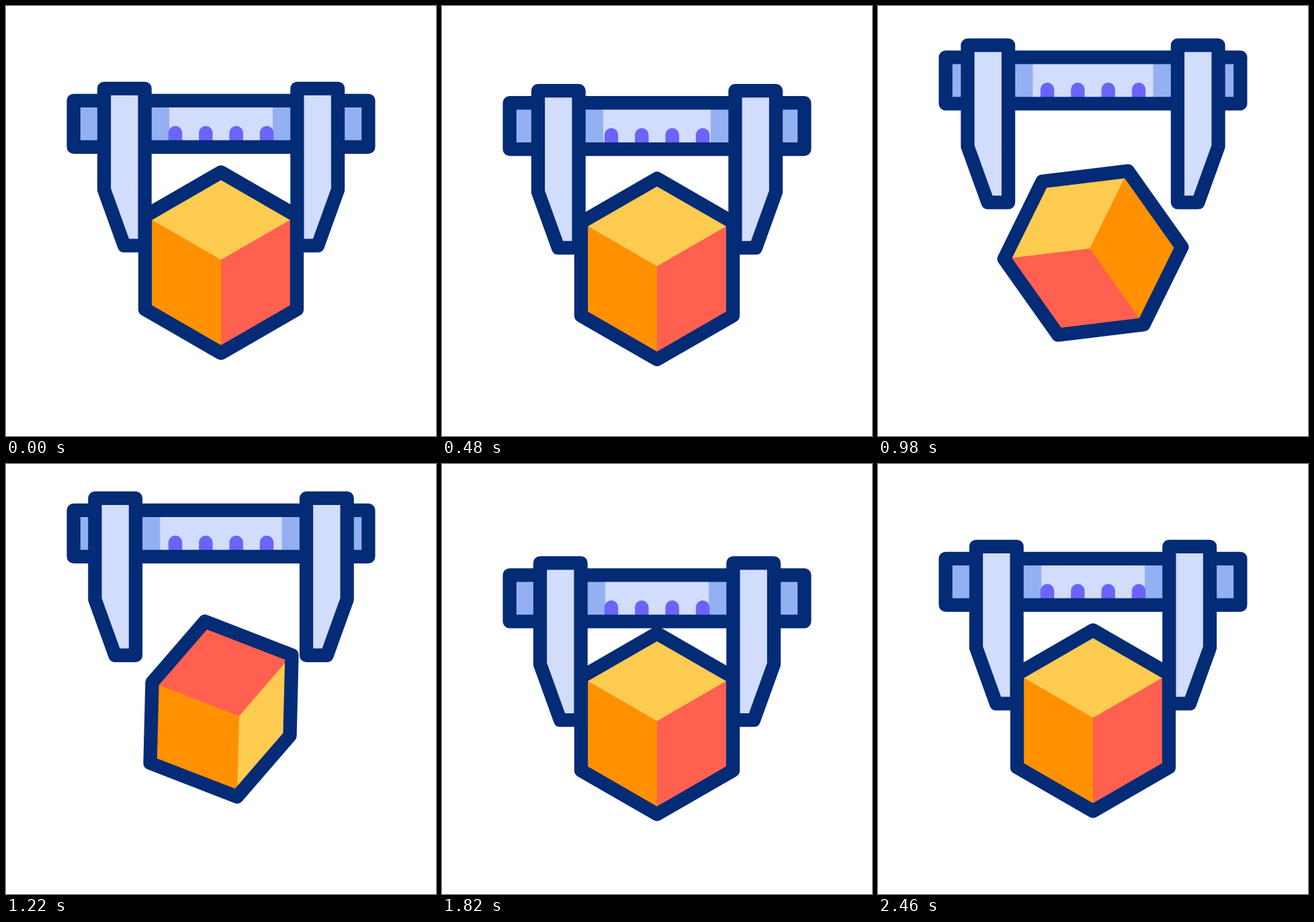
Animation, 640 px wide and 640 px high, one loop 3000 ms. Source, as an HTML page with a canvas:

```html
<!DOCTYPE html>
<html>
<head>
<meta charset="utf-8">
<style>
  html, body { margin: 0; width: 100%; height: 100%; overflow: hidden; background: #fff; }
  canvas { display: block; width: 640px; height: 640px; }
</style>
</head>
<body>
<canvas id="stage" width="640" height="640"></canvas>
<script>
const ctx = document.getElementById('stage').getContext('2d');
const LOOP = 3000;
const NAVY = '#032b76', PALE = '#d2dcfc', BLUE = '#93b1f2', VIOLET = '#6a64fa';
const YELLOW = '#fdcb50', ORANGE = '#ff9100', RED = '#ff6050';

// Cubic bezier easing, solved by bisection
function bezier(x1, y1, x2, y2) {
  const at = (a, b, s) => 3 * s * (1 - s) ** 2 * a + 3 * s * s * (1 - s) * b + s ** 3;
  return u => {
    let lo = 0, hi = 1;
    for (let i = 0; i < 24; i++) {
      const mid = (lo + hi) / 2;
      if (at(x1, x2, mid) < u) lo = mid; else hi = mid;
    }
    return at(y1, y2, lo);
  };
}

const smooth = u => u * u * (3 - 2 * u);
const glide = bezier(0.16, 0.42, 0.2, 1);
const spin = bezier(0.525, 0, 0.458, 1);
const settle = bezier(0.33, 0, 0.3, 1);

// Keys are [time, value, easing towards this key]
function track(keys) {
  return t => {
    if (t <= keys[0][0]) return keys[0][1];
    for (let i = 1; i < keys.length; i++) {
      const [t0, v0] = keys[i - 1], [t1, v1, ease] = keys[i];
      if (t < t1) return v0 + (v1 - v0) * ease((t - t0) / (t1 - t0));
    }
    return keys[keys.length - 1][1];
  };
}

const caliperY = track([
  [200, 0], [400, 24.5, smooth], [1520, -74.5, glide],
  [1820, 24.5, smooth], [2120, -16.5, smooth], [2460, 0, settle]
]);
const jawSpread = track([[400, 0], [1520, 14, glide], [1820, 0, smooth]]);
const cubeY = track([
  [280, 0], [480, 9.5, smooth], [1600, -18.5, glide],
  [1900, 9.5, smooth], [2180, -6.4, smooth], [2460, 0, settle]
]);
const cubeTurn = track([[480, 0], [1600, 2 * Math.PI, spin]]);
const TILT = 65.2;
const cubeTilt = track([[480, TILT], [1040, -TILT, smooth], [1690, TILT, smooth]]);

function poly(points, fill, outlined) {
  ctx.beginPath();
  points.forEach(([x, y]) => ctx.lineTo(x, y));
  ctx.closePath();
  if (fill) { ctx.fillStyle = fill; ctx.fill(); }
  if (outlined) ctx.stroke();
}

function drawCube(t) {
  const w = 113, c = 69.4, h = cubeTilt(t), a = Math.abs(h);
  const end = h >= 0 ? -c : c;
  const hexagon = [[0, -c - a], [w, -c], [w, c], [0, c + a], [-w, c], [-w, -c]];
  const side = s => [[s * w, -c], [0, h - c], [0, h + c], [s * w, c]];
  ctx.save();
  ctx.translate(320, 382 + cubeY(t));
  ctx.rotate(cubeTurn(t));
  poly(hexagon, RED);
  poly(side(-1), ORANGE);
  poly([[0, end - a], [w, end], [0, end + a], [-w, end]], YELLOW);
  poly(hexagon, null, true);
  ctx.restore();
}

function drawJaw(spread) {
  ctx.save();
  ctx.translate(-spread, 0);
  poly([[146, 122.8], [206.6, 122.8], [206.6, 356.7], [176, 356.7], [146, 273.5]], PALE, true);
  ctx.restore();
}

function drawCaliper(t) {
  const spread = jawSpread(t);
  const bar = [[100.6, 140.8], [539.4, 140.8], [539.4, 209.8], [100.6, 209.8]];
  ctx.save();
  ctx.translate(0, caliperY(t));
  poly(bar, BLUE);
  ctx.fillStyle = PALE;
  ctx.fillRect(243 - spread, 141, 154 + 2 * spread, 69);
  ctx.fillStyle = VIOLET;
  for (let i = 0; i < 4; i++) {
    const x = 252 + 45.35 * i;
    ctx.beginPath();
    ctx.arc(x, 188.6, 10.2, Math.PI, 0);
    ctx.lineTo(x + 10.2, 209);
    ctx.lineTo(x - 10.2, 209);
    ctx.fill();
  }
  poly(bar, null, true);
  drawJaw(spread);
  ctx.translate(640, 0);
  ctx.scale(-1, 1);
  drawJaw(spread);
  ctx.restore();
}

function render(t) {
  ctx.fillStyle = '#fff';
  ctx.fillRect(0, 0, 640, 640);
  ctx.strokeStyle = NAVY;
  ctx.lineWidth = 20.3;
  ctx.lineJoin = 'round';
  drawCube(t);
  drawCaliper(t);
}

function frame() {
  render(performance.now() % LOOP);
  requestAnimationFrame(frame);
}
frame();
</script>
</body>
</html>
```
